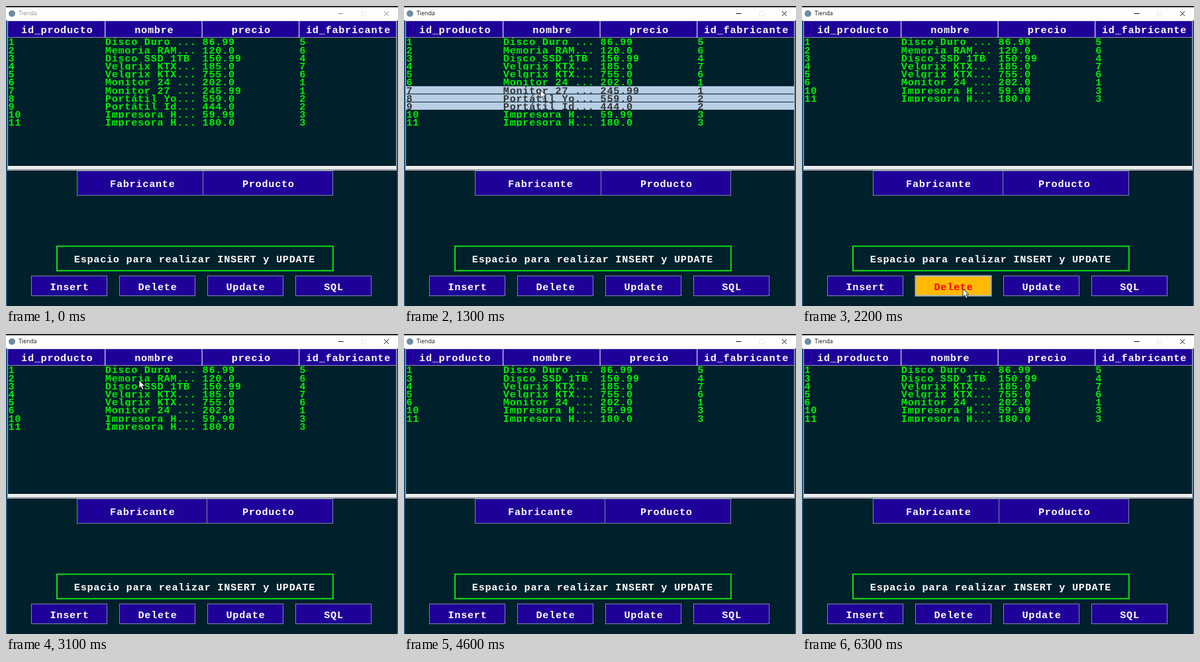
An HTML page for the animation above (7.2 s loop, 592 by 454 pixels).

```html
<!DOCTYPE html>
<html lang="es">
<head>
<meta charset="utf-8">
<title>Tienda</title>
<style>
  html, body { margin: 0; width: 100%; height: 100%; overflow: hidden; background: #00202c; }
  svg { display: block; }
  text { font: bold 15.2px "Courier New", "Liberation Mono", monospace; letter-spacing: .73px; white-space: pre; fill: #fff; }
  .mid { text-anchor: middle; }
  .title { font: 8.8px "Open Sans", sans-serif; letter-spacing: 0; }
  #rows text { fill: #00f000; }
  #rows .on text { fill: #333; }
  .btn rect { fill: #1f0099; stroke: #7a8a99; }
  .btn.hover rect { fill: #ffb900; stroke: #a3b8cc; stroke-width: 2; }
  .btn.hover text { fill: #f00; }
</style>
</head>
<body>
<svg id="stage" width="592" height="454" viewBox="0 0 592 454"></svg>
<script>
const LOOP = 7200, STEP = 100, TOP = 48, ROW_H = 12.2;
const COLS = [3.4, 149.8, 296.6, 443.2];
const ITEMS = [
  [1, "Disco Duro ...", "86.99", 5],
  [2, "Memoria RAM...", "120.0", 6],
  [3, "Disco SSD 1TB", "150.99", 4],
  [4, "Velgrix KTX...", "185.0", 7],
  [5, "Velgrix KTX...", "755.0", 6],
  [6, "Monitor 24 ...", "202.0", 1],
  [7, "Monitor 27 ...", "245.99", 1],
  [8, "Portátil Yo...", "559.0", 2],
  [9, "Portátil Id...", "444.0", 2],
  [10, "Impresora H...", "59.99", 3],
  [11, "Impresora H...", "180.0", 3]
];
// Mouse path: time, x, y
const PATH = [
  [300, 240, 460], [900, 200, 150], [1000, 200, 152], [1300, 206, 127], [1400, 206, 127],
  [1900, 243, 428], [2400, 243, 428], [3100, 201, 70], [3200, 201, 67], [3400, 201, 67],
  [4000, 235, 425], [4200, 235, 425], [4500, 250, 470], [4600, 300, 470],
  [5000, 342, 428], [5900, 342, 428], [6100, 380, 470]
];

const rect = (x, y, w, h, fill, more = "") =>
  `<rect x="${x}" y="${y}" width="${w}" height="${h}" fill="${fill}" ${more}/>`;
const label = (x, y, s, cls = "mid") => `<text x="${x}" y="${y}" class="${cls}">${s}</text>`;
const button = (x, y, w, h, tx, ty, name) =>
  `<g class="btn" id="${name}">${rect(x, y, w, h, "none")}${label(tx, ty, name)}</g>`;

const BUTTONS = ["Insert", "Delete", "Update", "SQL"].map((name, i) => ({ name, x: 38.5 + i * 133 }));

const stage = document.getElementById("stage");
stage.innerHTML =
  rect(0, 0, 592, 454, "#00202c") +
  rect(0, 0, 592, 2, "#24272b") +
  rect(0, 2, 592, 20, "#fff") +
  `<circle cx="9" cy="11.5" r="5" fill="#6d8ba3"/>` +
  `<g id="caption">${label(19, 14.4, "Tienda", "title")}
    <path d="M501.5 11.5h8M571 8l7 7m0-7l-7 7" fill="none"/></g>
  <path d="M536.5 8.5h6.5v6.5h-6.5z" fill="none" stroke="#e8e8e8"/>` +
  rect(0, 22, 1.5, 432, "#1c5f8f") +
  rect(590.5, 22, 1.5, 432, "#1c5f8f") +
  rect(2.5, 22.5, 587, 226, "none", 'stroke="#c4ccd4"') +
  rect(3, 23, 586, 24, "#1f0099") +
  rect(3, 47, 586, 1, "#8a98b8") +
  [149, 295.5, 442].map(x => rect(x, 22, 1.2, 26, "#dcdcf0")).join("") +
  ["id_producto", "nombre", "precio", "id_fabricante"]
    .map((s, i) => label(77.2 + i * 146.6, 41, s)).join("") +
  `<g id="rows"></g>` +
  rect(3, 242, 586, 5.5, "#eeeeee") +
  button(107.5, 249.5, 190, 37, 206.3, 274, "Fabricante") +
  button(297.5, 249.5, 196, 37, 396.3, 274, "Producto") +
  rect(77, 363.5, 416.8, 37, "none", 'stroke="#10e010" stroke-width="2"') +
  label(284.9, 388, "Espacio para realizar INSERT y UPDATE") +
  BUTTONS.map(b => button(b.x, 408.5, 114, 30, b.x + 57.5, 430, b.name)).join("") +
  `<path id="mouse" d="M0 0V12.3L2.8 9.6L4.9 14.3L7 13.4L5 8.8H8.8Z"
    fill="#fff" stroke="#000" stroke-width=".8"/>`;

const el = id => document.getElementById(id);

function mouseAt(t) {
  const i = PATH.findIndex(p => p[0] > t);
  if (i < 1) return (i ? PATH.at(-1) : PATH[0]).slice(1);
  const [t0, x0, y0] = PATH[i - 1], [t1, x1, y1] = PATH[i];
  const u = (t - t0) / (t1 - t0), k = u * u * (3 - 2 * u);
  return [x0 + (x1 - x0) * k, y0 + (y1 - y0) * k];
}

// First and last selected id
function selection(t, y) {
  if (t >= 1000 && t < 2100) return [t < 1300 ? Math.floor((y - TOP) / ROW_H) + 1 : 7, 9];
  return t >= 3200 && t < 4200 ? [2, 2] : [0, 0];
}

function tableRow(item, i, on) {
  const cells = item.map((s, c) => label(COLS[c], 11.4, s, "")).join("");
  const back = on ? rect(3, 0, 586, ROW_H - 0.8, "#b8cfe5") : "";
  return `<svg y="${TOP + i * ROW_H}" width="592" height="${ROW_H}" class="${on ? "on" : ""}">${back}${cells}</svg>`;
}

function draw(t) {
  const [x, y] = mouseAt(t), [from, to] = selection(t, y);
  el("mouse").setAttribute("transform", `translate(${x} ${y})`);

  el("rows").innerHTML = ITEMS
    .filter(([id]) => !(t >= 2100 && id > 6 && id < 10) && !(t >= 4200 && id === 2))
    .map((item, i) => tableRow(item, i, item[0] >= from && item[0] <= to)).join("");

  const ink = t < 1000 ? "#8c8c8c" : "#111";
  el("caption").querySelector("text").style.fill = ink;
  el("caption").querySelector("path").style.stroke = ink;

  const split = t >= 2100 && t < 5200 ? 303.5 : 297.5;
  el("Fabricante").firstChild.setAttribute("width", split - 107.5);
  el("Producto").firstChild.setAttribute("x", split);
  el("Producto").firstChild.setAttribute("width", 493.5 - split);

  for (const b of BUTTONS)
    el(b.name).classList.toggle("hover", x > b.x && x < b.x + 114 && y > 408 && y < 439);
}

let last = -1;
function tick(now) {
  const t = Math.floor((now % LOOP) / STEP) * STEP;
  if (t !== last) draw(last = t);
  requestAnimationFrame(tick);
}
draw(0);
requestAnimationFrame(tick);
</script>
</body>
</html>
```
